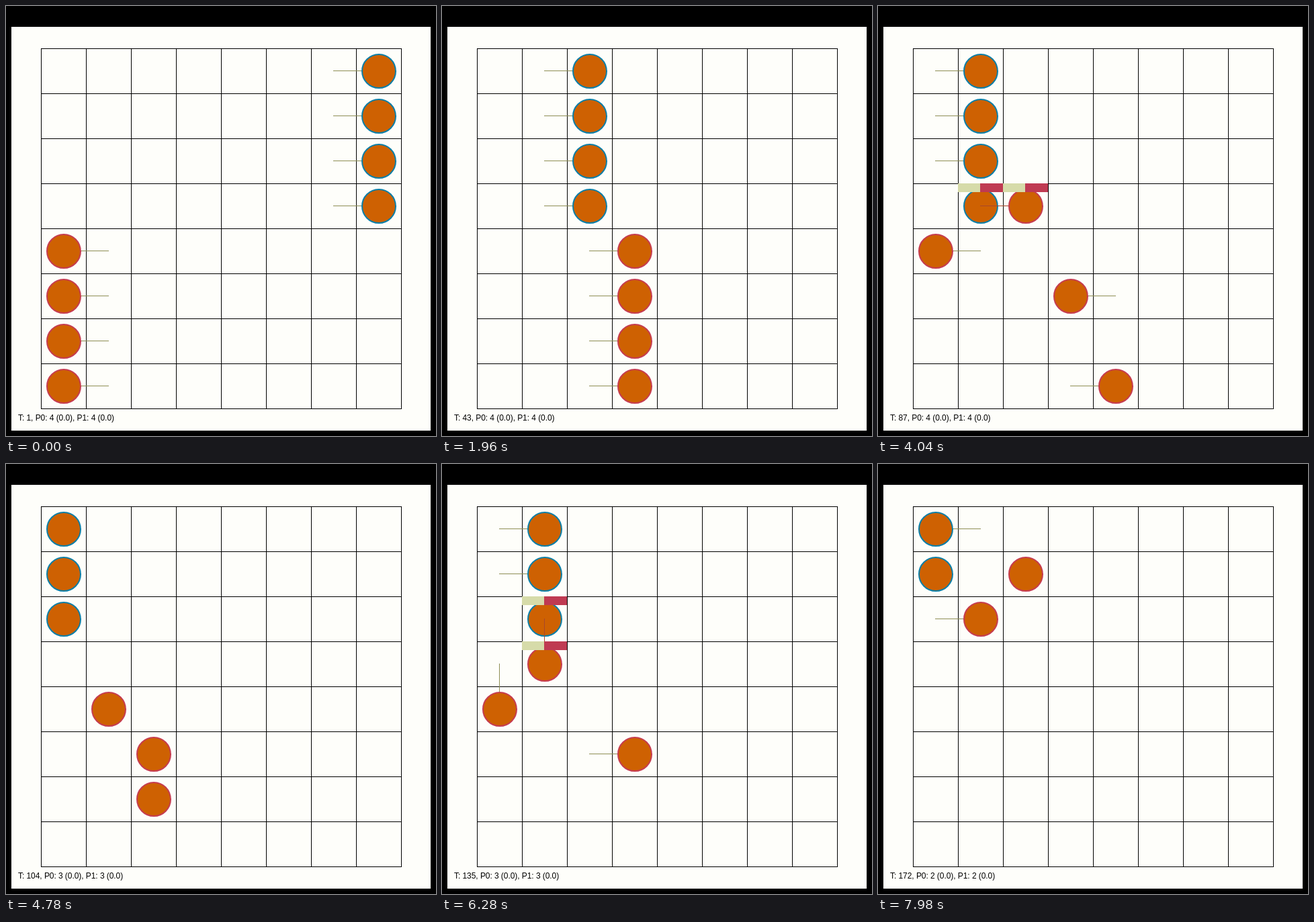
Animation, 640 px wide and 640 px high, one loop 8 s. Source, as an HTML page with a canvas:

```html
<!DOCTYPE html>
<html lang="en">
<head>
<meta charset="utf-8">
<title>Grid skirmish</title>
<style>
  html, body { margin: 0; width: 100%; height: 100%; overflow: hidden; background: #000; }
  canvas { display: block; }
</style>
</head>
<body>
<canvas id="stage" width="640" height="640"></canvas>
<script>
const ctx = document.getElementById('stage').getContext('2d');
const LOOP = 8000, CELL = 67, LEFT = 52, TOP = 63, SIZE = 8;
const MOVE_TICKS = 8, HIT_TICKS = 5;
const STEP = { L: [-1, 0], R: [1, 0], U: [0, -1], D: [0, 1], '.': [0, 0] };

// One letter per order; a closing lowercase letter is a duel in that direction.
const advance = 'LLLLLLL', patrol = 'RRRRLLL';
const unit = (player, col, row, orders) => ({ player, col, row, orders });
const units = [
  unit(1, 7, 0, advance + 'RL'.repeat(7) + 'R'),
  unit(1, 7, 1, advance + 'RL'.repeat(7) + '.'),
  unit(1, 7, 2, advance + 'RL'.repeat(4) + 'Rd'),
  unit(1, 7, 3, advance + 'RLRr'),
  unit(0, 0, 4, patrol + 'LRLRLRLRLURLRUL'),
  unit(0, 0, 5, patrol + 'RUUl'),
  unit(0, 0, 6, patrol + 'RRURLLUULu'),
  unit(0, 0, 7, patrol + 'RRRLLU.RULUUUU.')
];
const OUTLINE = ['#c63c50', '#0c7fa8'];

// Ticks come in threes lasting 20, 20 and 100 ms.
function tickAt(ms) {
  const shifted = ms + 20, rest = shifted % 140;
  return 3 * Math.floor(shifted / 140) + (rest < 20 ? 0 : rest < 40 ? 1 : 2);
}

function stateAt({ player, col, row, orders }, tick) {
  const last = orders.length - 1;
  const index = Math.min(Math.floor(tick / MOVE_TICKS), last);
  for (const order of orders.slice(0, index)) {
    col += STEP[order][0];
    row += STEP[order][1];
  }
  const order = orders[index], dir = order.toUpperCase();
  const fighting = order !== dir && order !== '.';
  const age = tick - index * MOVE_TICKS;
  return {
    player, col, row, fighting,
    aim: STEP[dir],
    busy: dir !== '.' && age % (fighting ? HIT_TICKS : MOVE_TICKS) !== 0,
    hurt: fighting && age >= HIT_TICKS,
    alive: !(fighting && age >= 2 * HIT_TICKS)
  };
}

function drawBoard() {
  ctx.fillStyle = '#000';
  ctx.fillRect(0, 0, 640, 640);
  ctx.fillStyle = '#fefefa';
  ctx.fillRect(8, 31, 624, 601);
  ctx.fillStyle = '#000';
  const span = SIZE * CELL + 1;
  for (let i = 0; i <= SIZE; i++) {
    ctx.fillRect(LEFT + i * CELL, TOP, 1, span);
    ctx.fillRect(LEFT, TOP + i * CELL, span, 1);
  }
}

function drawUnit({ player, col, row, aim, busy, fighting, hurt }) {
  const x = LEFT + col * CELL, y = TOP + row * CELL;
  if (busy) {
    ctx.strokeStyle = fighting ? '#a8482c' : '#8e8e54';
    ctx.lineWidth = 1;
    ctx.lineCap = 'square';
    ctx.beginPath();
    ctx.moveTo(x + 33.5, y + 33.5);
    ctx.lineTo(x + 33.5 + aim[0] * CELL, y + 33.5 + aim[1] * CELL);
    ctx.stroke();
  }
  ctx.beginPath();
  ctx.arc(x + 34, y + 34, 25, 0, 2 * Math.PI);
  ctx.fillStyle = '#ce6102';
  ctx.fill();
  ctx.strokeStyle = OUTLINE[player];
  ctx.lineWidth = 2;
  ctx.stroke();
  if (hurt) {
    ctx.fillStyle = '#d6dba9';
    ctx.fillRect(x, y, 33, 13);
    ctx.fillStyle = '#bf3a52';
    ctx.fillRect(x + 33, y, 34, 13);
  }
}

function drawStatus(tick, alive) {
  const count = player => alive.filter(u => u.player === player).length;
  ctx.fillStyle = '#000';
  ctx.font = '12px "Liberation Sans", Arial, sans-serif';
  ctx.letterSpacing = '-0.06px';
  ctx.fillText(`T: ${tick}, P0: ${count(0)} (0.0), P1: ${count(1)} (0.0)`, 18, 617);
}

let start;
function frame(now) {
  start ??= now;
  const tick = tickAt((now - start) % LOOP);
  const alive = units.map(u => stateAt(u, tick)).filter(u => u.alive);
  drawBoard();
  alive.forEach(drawUnit);
  drawStatus(tick, alive);
  requestAnimationFrame(frame);
}
requestAnimationFrame(frame);
</script>
</body>
</html>
```
